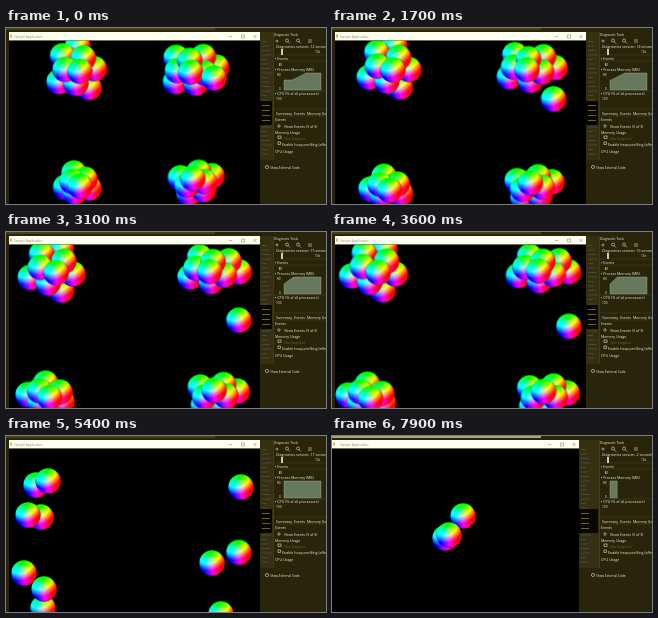
Recreate the animation shown at these times as an HTML page with a canvas. Size 320 by 176 pixels, loop 8 s.

```html
<!DOCTYPE html>
<html lang="en">
<head>
<meta charset="utf-8">
<title>Colliding spheres</title>
<style>
html, body { margin: 0; width: 100%; height: 100%; overflow: hidden; background: #29250a; }
canvas, svg { position: absolute; left: 0; top: 0; width: 320px; height: 176px; }
text { font: 3.2px "Open Sans", sans-serif; fill: #f0f0dc; white-space: pre; }
.wide { font-size: 3.6px; }
.dim { fill: #6c6738; }
.dark { fill: #8c8c72; }
.icon { fill: none; stroke: #c8c4a0; stroke-width: .7; }
</style>
</head>
<body>
<canvas id="view" width="320" height="176"></canvas>
<svg viewBox="0 0 320 176">
  <text class="dark" x="8" y="9.500">Sample Application</text>
  <path id="buttons" fill="none" stroke="#8c8c72" stroke-width=".6"
    d="M223 8.500h3M235.500 7h3v3h-3zM247.500 7l3 3m0-3l-3 3"/>
  <text x="268" y="7.500">Diagnostic Tools</text>
  <circle class="icon" cx="261" cy="139" r="1.600"/>
  <text x="264" y="140.500">Show External Code</text>
  <g id="idle">
    <path d="M268 59.500h52M268 66.500h52" stroke="#77724a" stroke-width=".5"/>
    <text class="wide" x="270" y="64.500">Summary  Events  Memory Usage  CPU Usage</text>
  </g>
  <g id="panel">
    <path class="icon" d="M269.500 13h3m-1.500-1.500v3M302 12h4m-4 2h4"/>
    <g id="lens">
      <circle class="icon" cx="281" cy="12.500" r="1.500"/>
      <path class="icon" d="M282 13.500l2 2"/>
    </g>
    <use href="#lens" x="11"/>
    <text id="session" class="wide" x="270" y="20"></text>
    <path d="M268 27h52M268 33h52M268 63h52M268 81h52M268 88h52" stroke="#504b22" stroke-width=".4"/>
    <path d="M276 21v6" stroke="#fff" stroke-width="1.500"/>
    <text x="309" y="25">10s</text>
    <text class="wide" x="269" y="32">▪ Events</text>
    <path d="M273.500 35v3m1.500-3v3" stroke="#f0f0dc" stroke-width=".6"/>
    <text class="wide" x="269" y="43">▪ Process Memory (MB)</text>
    <text x="271" y="48">80</text>
    <text x="273" y="62">0</text>
    <polygon id="graph" fill="#66795c" stroke="#a8b096" stroke-width=".4"/>
    <text class="wide" x="269" y="67">▪ CPU (% of all processors)</text>
    <text x="270" y="72">100</text>
    <text class="wide" x="270" y="86.500">Summary  Events  Memory Usage</text>
    <text class="wide" x="269" y="93">Events</text>
    <circle class="icon" cx="273" cy="98" r="1.200"/>
    <text class="wide" x="278" y="99.500">Show Events (3 of 3)</text>
    <text class="wide" x="269" y="105.500">Memory Usage</text>
    <rect class="icon" x="272" y="108" width="3" height="2.500"/>
    <text class="dim" x="278" y="111.500">Take Snapshot</text>
    <rect class="icon" x="272" y="114" width="2.500" height="2.500"/>
    <text class="wide" x="276" y="117.500">Enable heap profiling (affects performance)</text>
    <text class="wide" x="269" y="124.500">CPU Usage</text>
  </g>
</svg>
<script>
const $ = id => document.getElementById(id);
const ctx = $('view').getContext('2d');
const LOOP = 8, BREAK = 3.6, SPREAD = 5.4, RESTART = 6.3, FIRST_HIT = 6.7, PANEL_BACK = 7;
const R = 12.7, GOLDEN = 2.39996, WALL = 242;

// Clusters drift and stretch in a straight line; a few balls end at `stay`, the rest leave.
const clusters = [
  { n: 9, turn: .6, from: [69, 40, 24, 24], to: [42, 36, 28, 23],
    stay: [[42, 45], [30, 49], [22, 79], [35, 81]] },
  { n: 9, turn: 2, from: [187, 40, 25, 19], to: [211, 36, 28, 16],
    stay: [[235, 51], [206, 127]] },
  { n: 7, turn: 1, from: [72, 155, 13, 13], to: [37, 163, 21, 13],
    stay: [[18, 137], [38, 153], [37, 172]] },
  { n: 8, turn: 4, from: [190, 153, 19, 13], to: [214, 163, 23, 15],
    stay: [[215, 178]] }
];

const mix = (a, b, k) => a + (b - a) * k;

function makeBall() {
  const size = 28, c = size / 2, ball = document.createElement('canvas');
  ball.width = ball.height = size;
  const g = ball.getContext('2d'), img = g.createImageData(size, size);
  const lights = [[25, 1.4], [-110, 1.6], [145, 1.3]]; // angle and strength of red, green, blue
  for (let y = 0; y < size; y++) for (let x = 0; x < size; x++) {
    const dx = (x + .5 - c) / R, dy = (y + .5 - c) / R, d = Math.hypot(dx, dy);
    const z = Math.sqrt(Math.max(0, 1 - d * d)), i = (y * size + x) * 4;
    lights.forEach(([deg, gain], n) => {
      const a = deg * Math.PI / 180;
      const lit = .85 * (dx * Math.cos(a) + dy * Math.sin(a)) + .6 * z;
      img.data[i + n] = 255 * Math.min(1, Math.max(0, lit * gain) ** 1.3);
    });
    img.data[i + 3] = 255 * Math.min(1, Math.max(0, (1 - d) * R + .5));
  }
  g.putImageData(img, 0, 0);
  return ball;
}
const ball = makeBall();
const drawBall = (x, y) => ctx.drawImage(ball, x - 14, y - 14);

function rect(color, x, y, w, h) {
  ctx.fillStyle = color;
  ctx.fillRect(x, y, w, h);
}

function drawCluster({ n, turn, from, to, stay }, t) {
  const k = Math.min(1, t / BREAK);
  const leave = Math.max(0, (t - BREAK) / (SPREAD - BREAK));
  const [cx, cy, rx, ry] = from.map((v, i) => mix(v, to[i], k));
  // Outer balls lie behind the inner ones.
  for (let i = n - 1; i >= 0; i--) {
    const r = Math.sqrt((i + .5) / (n - .5)), a = turn + i * GOLDEN + k * .3;
    const x = cx + rx * r * Math.cos(a), y = cy + ry * r * Math.sin(a);
    const [ex, ey] = stay[i] || [x + (x - 127) * 1.3, y + (y - 94) * 1.3];
    drawBall(mix(x, ex, leave), mix(y, ey, leave));
  }
}

function drawCrowd(t) {
  clusters.forEach(c => drawCluster(c, t));
  // One ball breaks away early and bounces off the right wall.
  const x = 208 + 8 * t;
  drawBall(WALL - Math.abs(WALL - x), 50 + 12.3 * t);
}

function drawFresh(t) {
  const k = Math.max(0, (t - FIRST_HIT) / 1.2);
  drawBall(mix(130, 131, k), mix(92, 80, k));
  if (k) drawBall(mix(130, 113, k), mix(92, 102, k));
  if (k > .4) drawBall(mix(130, 117, k), mix(92, 99, k));
}

function drawDesktop(right, again) {
  rect('#29250a', 0, 0, 320, 176);
  rect(again ? '#a8a48a' : '#454016', 0, 0, 209, 2);
  rect('#353010', right, 4, 267 - right, 128);
  for (let y = 13; y < 128; y += 4.5)
    rect('#4c4b3c', right + 2, y, 4 + y * 7 % 6, 1);
  rect('#080800', right, 73, 266 - right, 24);
  for (let y = 77; y < 95; y += 5) rect('#67623a', right + 2, y, 8, 1);
  rect('#504b22', 267, 4, .6, 128);
}

function draw(now) {
  const t = Math.floor(now / 100) % (LOOP * 10) / 10;
  const again = t >= RESTART, left = again ? 0 : 3, right = again ? 247 : 254;
  drawDesktop(right, again);
  rect('#fffff0', left, 4, right - left, 8.5);
  rect('#d8b850', left + 1, 6.5, 2, 3);

  ctx.save();
  ctx.beginPath();
  ctx.rect(left, 12.5, right - left, 163.5);
  ctx.clip();
  rect('#000', left, 12.5, right - left, 163.5);
  (again ? drawFresh : drawCrowd)(t);
  ctx.restore();

  const idle = again && t < PANEL_BACK;
  $('idle').style.display = idle ? '' : 'none';
  $('panel').style.display = idle ? 'none' : '';
  $('buttons').setAttribute('transform', `translate(${right - 254} 0)`);
  $('session').textContent =
    `Diagnostics session: ${Math.floor(again ? t - 5.4 : t + 12.5)} seconds`;

  // The memory curve scrolls left as time passes.
  const edge = x => Math.max(278, x - 4.1 * t);
  const end = again ? 278 + Math.max(0, t - PANEL_BACK) * 8 : 315;
  const start = again ? 45 : mix(52, 45, Math.max(0, Math.min(1, t - 4)));
  $('graph').setAttribute('points', again
    ? `278,62 278,45 ${end},45 ${end},62`
    : `278,62 278,${start} ${edge(286)},${start} ${edge(300)},45 ${end},45 ${end},62`);
  requestAnimationFrame(() => draw(performance.now()));
}
draw(performance.now());
</script>
</body>
</html>
```
